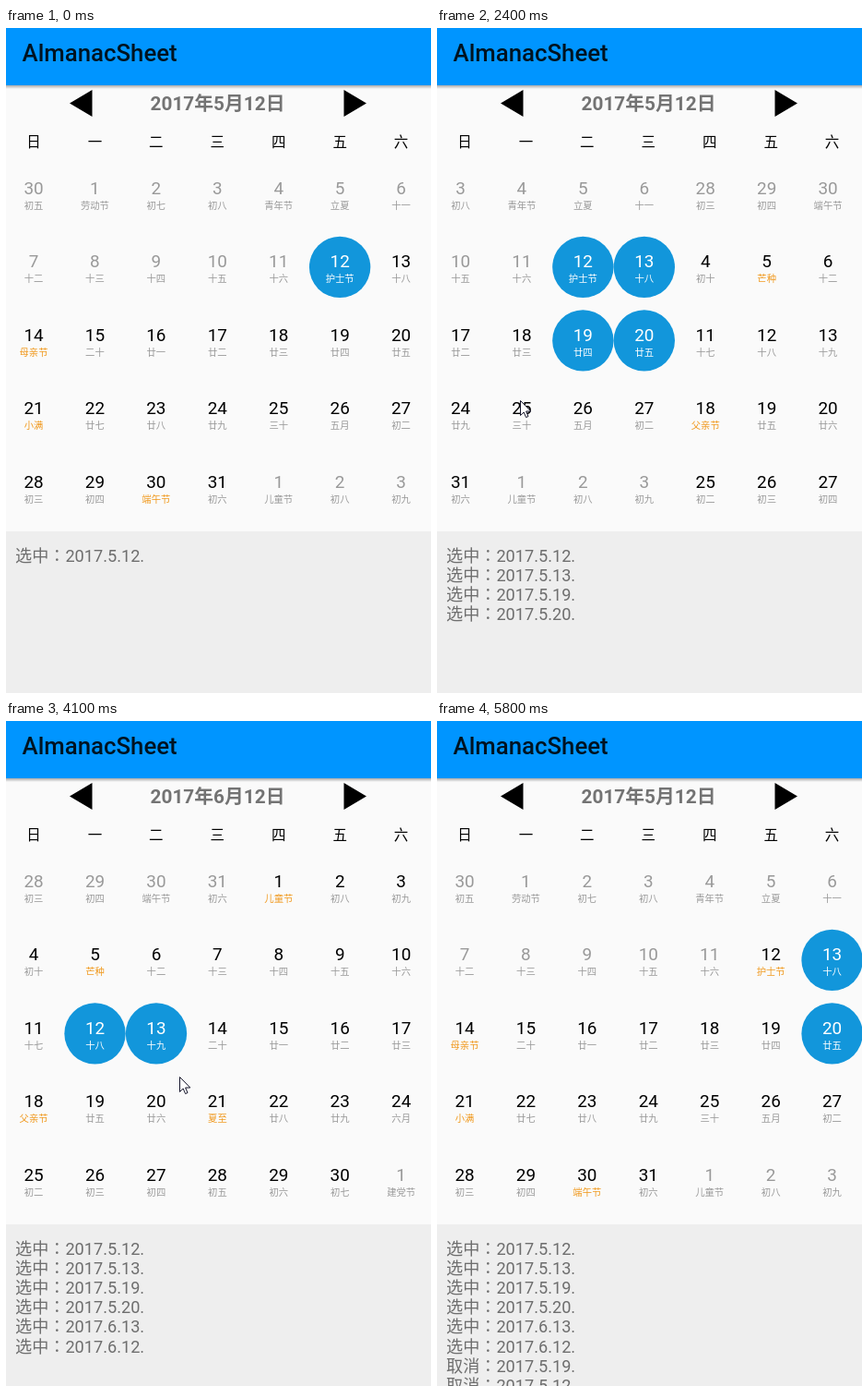
These frames come from a looping animation (461x720 px, 6400 ms). An HTML page:

```html
<!DOCTYPE html>
<html lang="zh-CN">
<head>
<meta charset="utf-8">
<title>Calendar</title>
<style>
  html, body { margin: 0; width: 100%; height: 100%; overflow: hidden; background: #fafafa; }
  svg { display: block; width: 461px; height: 720px; }
  text { font-family: Roboto, "Noto Sans CJK SC", "Noto Sans CJK", sans-serif; white-space: pre; }
  .mid { text-anchor: middle; }
  .title { font-size: 25.8px; font-weight: 500; fill-opacity: .87; }
  .date { font-size: 20.8px; font-weight: 700; fill: #737373; }
  .week { font-size: 15.5px; }
  .num { font-size: 18.9px; }
  .sub { font-size: 10.33px; fill: #999; }
  .off .num { fill: #999; }
  .fest .sub { fill: #f0981c; }
  .day circle { fill: #1296db; visibility: hidden; }
  .on circle { visibility: visible; }
  .on .num, .on .sub { fill: #fff; }
  .log { font-size: 18.15px; fill: #6e6e6e; }
  .colon { font-family: "Noto Sans CJK JP", "Noto Sans CJK", sans-serif; }
</style>
</head>
<body>
<svg id="stage" viewBox="0 0 461 720">
  <defs>
    <linearGradient id="shade" x2="0" y2="1">
      <stop offset="0" stop-opacity=".32"/>
      <stop offset="1" stop-opacity="0"/>
    </linearGradient>
  </defs>
  <rect width="461" height="720" fill="#fafafa"/>
  <g id="pages"></g>
  <rect y="545" width="461" height="175" fill="#eee"/>
  <g id="log"></g>
  <rect y="62" width="461" height="4" fill="url(#shade)"/>
  <rect width="461" height="62" fill="#0095ff"/>
  <text class="title" x="17.5" y="36">AlmanacSheet</text>
  <path d="M69 81.5L93.5 67V96ZM391 81.5L366.5 67V96Z"/>
  <text class="date mid" id="date" x="229.5" y="89.3"></text>
  <g id="week"></g>
  <path id="cursor" d="M.5 .5V16.5L4.2 13L6.6 18.6L9 17.5L6.6 12H11.8Z" fill="#fff" stroke="#15152b"/>
</svg>
<script>
const LOOP = 6400, STEP = 100, MOVE = 400, TAP_DELAY = 200, SLIDE = 700;
const PAGE = 465, COL = PAGE / 7, ROW = 79.5, LEFT = 30, TOP = 179.4;
const TODAY = 12; // days after 30 April
const FESTIVALS = {
  '5.1': '劳动节', '5.4': '青年节', '5.5': '立夏', '5.12': '护士节', '5.14': '母亲节',
  '5.21': '小满', '5.30': '端午节', '6.1': '儿童节', '6.5': '芒种', '6.18': '父亲节',
  '6.21': '夏至', '7.1': '建党节'
};
const SWIPE_LEFT = 2215, SWIPE_RIGHT = 4097;
// Pointer stops: arrival time, x, y, action
const STOPS = [
  [100, 456, 197],
  [700, 421, 277, 'tap'],
  [1200, 360, 353, 'tap'],
  [1700, 413, 347, 'tap'],
  [2400, 90, 403],
  [3000, 157, 334, 'tap'],
  [3500, 100, 340, 'tap'],
  [4100, 188, 385],
  [4500, 381, 389],
  [4900, 372, 350, 'tap'],
  [5500, 365, 263, 'tap']
];

const $ = id => document.getElementById(id);
const clamp = v => Math.min(1, Math.max(0, v));
const smooth = v => v * v * (3 - 2 * v);

function add(parent, tag, attrs, text = '') {
  const el = document.createElementNS('http://www.w3.org/2000/svg', tag);
  for (const key in attrs) el.setAttribute(key, attrs[key]);
  el.textContent = text;
  return parent.appendChild(el);
}

// A drag that speeds up, then settles slowly
function slide(t, start) {
  const u = 1 - clamp((t - start) / SLIDE);
  return smooth(1 - u * u);
}

const scrollAt = t => slide(t, SWIPE_LEFT) - slide(t, SWIPE_RIGHT);
const pageAt = t => Math.round(scrollAt(t));

function pointerAt(t) {
  let [, x, y] = STOPS[0];
  for (const [arrive, nextX, nextY] of STOPS) {
    const k = smooth(clamp((t - arrive + MOVE) / MOVE));
    x += (nextX - x) * k;
    y += (nextY - y) * k;
  }
  return [x, y];
}

// Lunar months begin on 26 May and 24 June
function lunar(n) {
  const d = n < 26 ? n + 5 : n < 55 ? n - 25 : n - 54;
  if (d === 1) return n < 55 ? '五月' : '六月';
  if (d === 20) return '二十';
  if (d === 30) return '三十';
  return '初十廿'[Math.floor((d - 1) / 10)] + '一二三四五六七八九十'[(d - 1) % 10];
}

function makePage(index, month, first) {
  const page = add($('pages'), 'g', { transform: `translate(${index * PAGE})` });
  return Array.from({ length: 35 }, (_, i) => {
    const n = first + i, date = new Date(2017, 3, 30 + n);
    const m = date.getMonth() + 1, key = m + '.' + date.getDate();
    const off = m !== month || n < TODAY, fest = FESTIVALS[key];
    const x = LEFT + i % 7 * COL, y = TOP + Math.floor(i / 7) * ROW;
    const base = 'day' + (off ? ' off' : fest ? ' fest' : '');
    const el = add(page, 'g', { class: base });
    add(el, 'circle', { cx: x, cy: y, r: 33.2 });
    add(el, 'text', { class: 'num mid', x, y: y + .3 }, date.getDate());
    add(el, 'text', { class: 'sub mid', x, y: y + 16.5 }, fest || lunar(n));
    return { el, key, base };
  });
}

const sheets = [makePage(0, 5, 0), makePage(1, 6, 28)];

[...'日一二三四五六'].forEach((c, i) =>
  add($('week'), 'text', { class: 'week mid', x: LEFT + i * COL, y: 128.6 }, c));

function cellUnder(x, y, page) {
  const col = Math.round((x - LEFT) / COL), row = Math.round((y - TOP) / ROW);
  return sheets[page][row * 7 + col];
}

const taps = [{ time: 0, cell: sheets[0][TODAY] }];
for (const [arrive, x, y, action] of STOPS) {
  const time = arrive + TAP_DELAY;
  if (action) taps.push({ time, cell: cellUnder(x, y, pageAt(time)) });
}

taps.forEach((tap, i) => {
  const again = taps.slice(0, i).some(other => other.cell === tap.cell);
  tap.line = add($('log'), 'text', { class: 'log', x: 10, y: 577.5 + i * 21.2 });
  add(tap.line, 'tspan', {}, again ? '取消' : '选中');
  add(tap.line, 'tspan', { class: 'colon', lang: 'ja' }, '：');
  add(tap.line, 'tspan', {}, `2017.${tap.cell.key}.`);
});

function render(time) {
  const t = Math.floor(time % LOOP / STEP) * STEP;
  const done = taps.filter(tap => tap.time <= t);
  for (const cell of sheets.flat()) {
    const on = done.filter(tap => tap.cell === cell).length % 2;
    cell.el.setAttribute('class', cell.base + (on ? ' on' : ''));
  }
  for (const tap of taps) {
    tap.line.setAttribute('visibility', tap.time <= t ? 'visible' : 'hidden');
  }

  $('pages').setAttribute('transform', `translate(${-PAGE * scrollAt(t)})`);
  $('date').textContent = `2017年${5 + pageAt(t)}月12日`;

  const shown = t >= STOPS[0][0] && t <= taps[taps.length - 1].time;
  $('cursor').setAttribute('visibility', shown ? 'visible' : 'hidden');
  $('cursor').setAttribute('transform', `translate(${pointerAt(t)})`);
}

const start = performance.now();
function tick() {
  render(performance.now() - start);
  requestAnimationFrame(tick);
}
tick();
</script>
</body>
</html>
```
